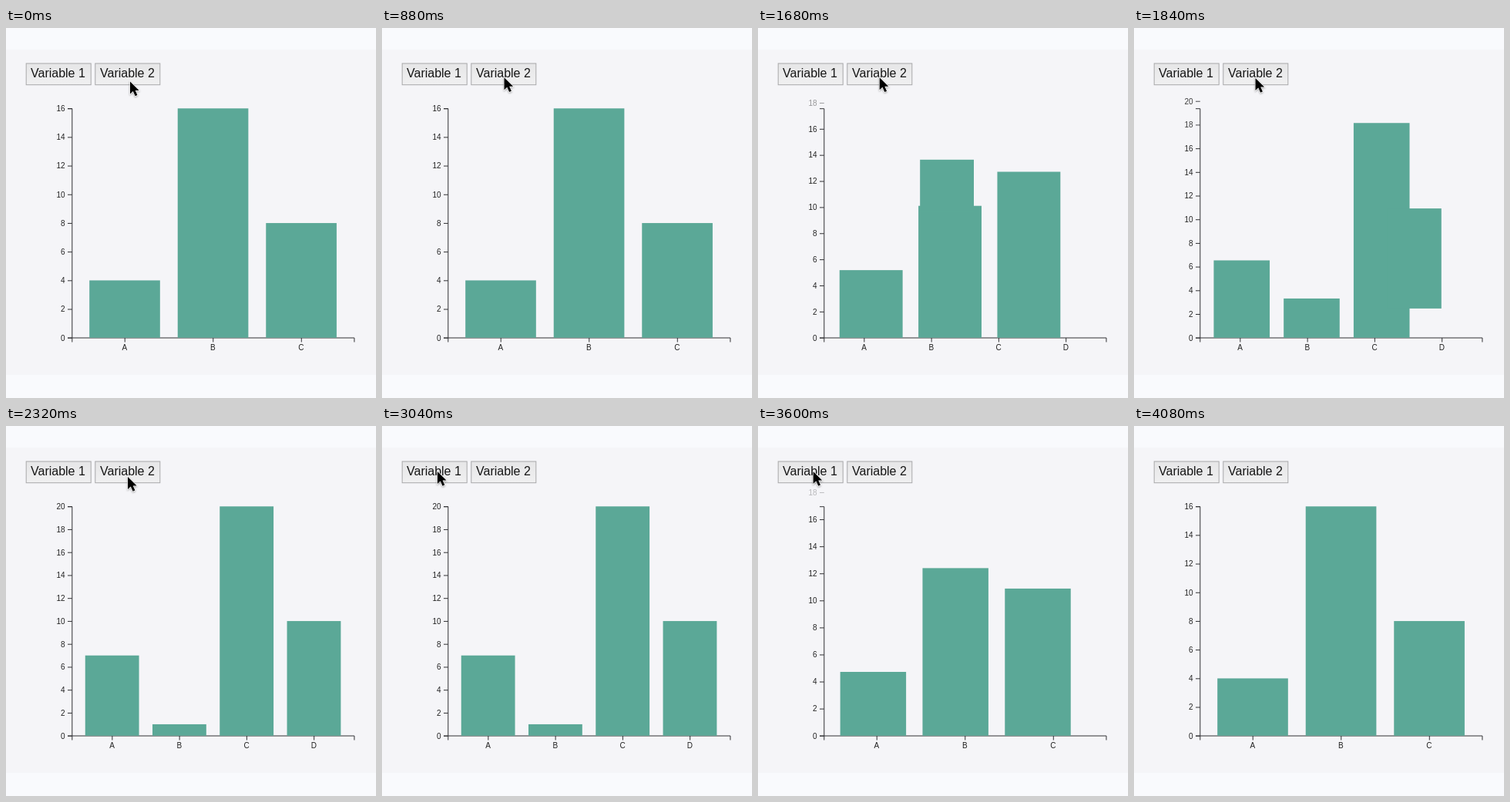
Animation, 480 px wide and 480 px high, one loop 4.64 s. Source, as an HTML page:

```html
<!DOCTYPE html>
<html lang="en">
<head>
<meta charset="utf-8">
<title>Bar chart</title>
<style>
  html, body { margin: 0; width: 100%; height: 100%; overflow: hidden; background: #f9fafd; }
  svg { display: block; width: 480px; height: 480px; }
  text { font: 10px "Liberation Sans", Arial, sans-serif; fill: #222; }
  .label { font-size: 16px; fill: #161616; }
  .axis { fill: none; stroke: #303033; }
  .bar { fill: #5ba897; }
</style>
</head>
<body>
<svg viewBox="0 0 480 480">
  <defs>
    <clipPath id="plot"><path d="M26 75H480V450H26z"/></clipPath>
    <linearGradient id="face" x2="0" y2="1">
      <stop stop-color="#e6e6e7"/><stop offset="1" stop-color="#f0f0f1"/>
    </linearGradient>
  </defs>
  <rect y="28" width="480" height="422" fill="#f5f5f8"/>
  <g fill="url(#face)" stroke="#a8a8aa">
    <rect x="26.2" y="46" width="84" height="27.7"/>
    <rect x="115.8" y="46" width="84" height="27.7"/>
  </g>
  <text class="label" x="32" y="64">Variable 1</text>
  <text class="label" x="122" y="64">Variable 2</text>
  <g id="chart" clip-path="url(#plot)"></g>
  <path id="cursor" d="M0 0V16L3.8 12.5L6.6 18.8L9.4 17.6L6.7 11.5H11.6Z"
        fill="#000" stroke="#fff" stroke-width="1.3" paint-order="stroke"
        style="filter: drop-shadow(0 1px 1px #0005)"/>
</svg>
<script>
const LOOP = 4640, STEP = 80;
const LEFT = 85.3, WIDTH = 366.5, TOP = 104.3, BASE = 401.8, HEIGHT = BASE - TOP;
const first = [4, 16, 8], second = [7, 1, 20, 10];
const chart = document.getElementById('chart');
const cursor = document.getElementById('cursor');

// time, x, y of the pointer tip
const path = [
  [0, 161, 69.5], [320, 159, 65], [800, 159, 65], [960, 158, 63.5], [1440, 158, 63],
  [1840, 157.5, 65], [2240, 157.5, 65], [2320, 158, 66], [2400, 158, 66],
  [2720, 72, 59], [4080, 71.5, 59]
];

const lerp = (a, b, p) => a + (b - a) * p;
const clamp = v => Math.min(1, Math.max(0, v));
const cubicInOut = t => t < .5 ? 4 * t ** 3 : 1 - 4 * (1 - t) ** 3;
const yPos = (v, max) => BASE - v / max * HEIGHT;

function band(n) {
  const step = WIDTH / (n + .2);
  return { width: step * .8, x: i => LEFT + step * (i + .2) };
}

function layout(data) {
  const b = band(data.length), max = Math.max(...data);
  return data.map((v, i) => [b.x(i), yPos(v, max), b.width, v / max * HEIGHT]);
}

function axes(from, to, p) {
  const m0 = Math.max(...from), m1 = Math.max(...to), b = band(to.length);
  let out = `<path class="axis" d="M80 ${TOP + .4}H85.8V402H80M85.8 407.5V402H451.9V407.5"/>`;
  for (let v = 0; v <= Math.max(m0, m1); v += 2) {
    const y = lerp(yPos(v, m0), yPos(v, m1), p) + .4;
    const alpha = lerp(v <= m0, v <= m1, p);
    out += `<g opacity="${alpha}"><path class="axis" d="M80 ${y}H85.8"/>
      <text x="76.5" y="${y + 3.3}" text-anchor="end">${v}</text></g>`;
  }
  to.forEach((_, i) => {
    const x = b.x(i) + b.width / 2 + .2;
    out += `<path class="axis" d="M${x} 402V407.5"/>
      <text x="${x - .3}" y="418" text-anchor="middle">${'ABCD'[i]}</text>`;
  });
  return out;
}

function bars(from, to, p) {
  const old = layout(from);
  return layout(to).map((end, i) => {
    const start = old[i] || [LEFT, TOP, end[2], 0];
    const [x, y, w, h] = end.map((v, k) => lerp(start[k], v, p));
    return `<rect class="bar" x="${x}" y="${y}" width="${w}" height="${h}"/>`;
  }).join('');
}

function pointer(t) {
  const i = path.findIndex(k => k[0] > t);
  cursor.style.display = i < 0 ? 'none' : '';
  if (i < 0) return;
  const a = path[i - 1], b = path[i], p = (t - a[0]) / (b[0] - a[0]);
  const s = p * p * (3 - 2 * p);
  cursor.setAttribute('transform', `translate(${lerp(a[1], b[1], s)} ${lerp(a[2], b[2], s)})`);
}

function draw(t) {
  const [from, to, start, span] =
    t < 1297 ? [first, first, 0, 1] :
    t < 3114 ? [first, second, 1297, 795] : [second, first, 3114, 829];
  const p = cubicInOut(clamp((t - start) / span));
  chart.innerHTML = axes(from, to, p) + bars(from, to, p);
  pointer(t);
}

let shown = -1;
const origin = performance.now();
function tick() {
  const t = Math.floor((performance.now() - origin) % LOOP / STEP) * STEP;
  if (t !== shown) draw(shown = t);
  requestAnimationFrame(tick);
}
tick();
</script>
</body>
</html>
```
